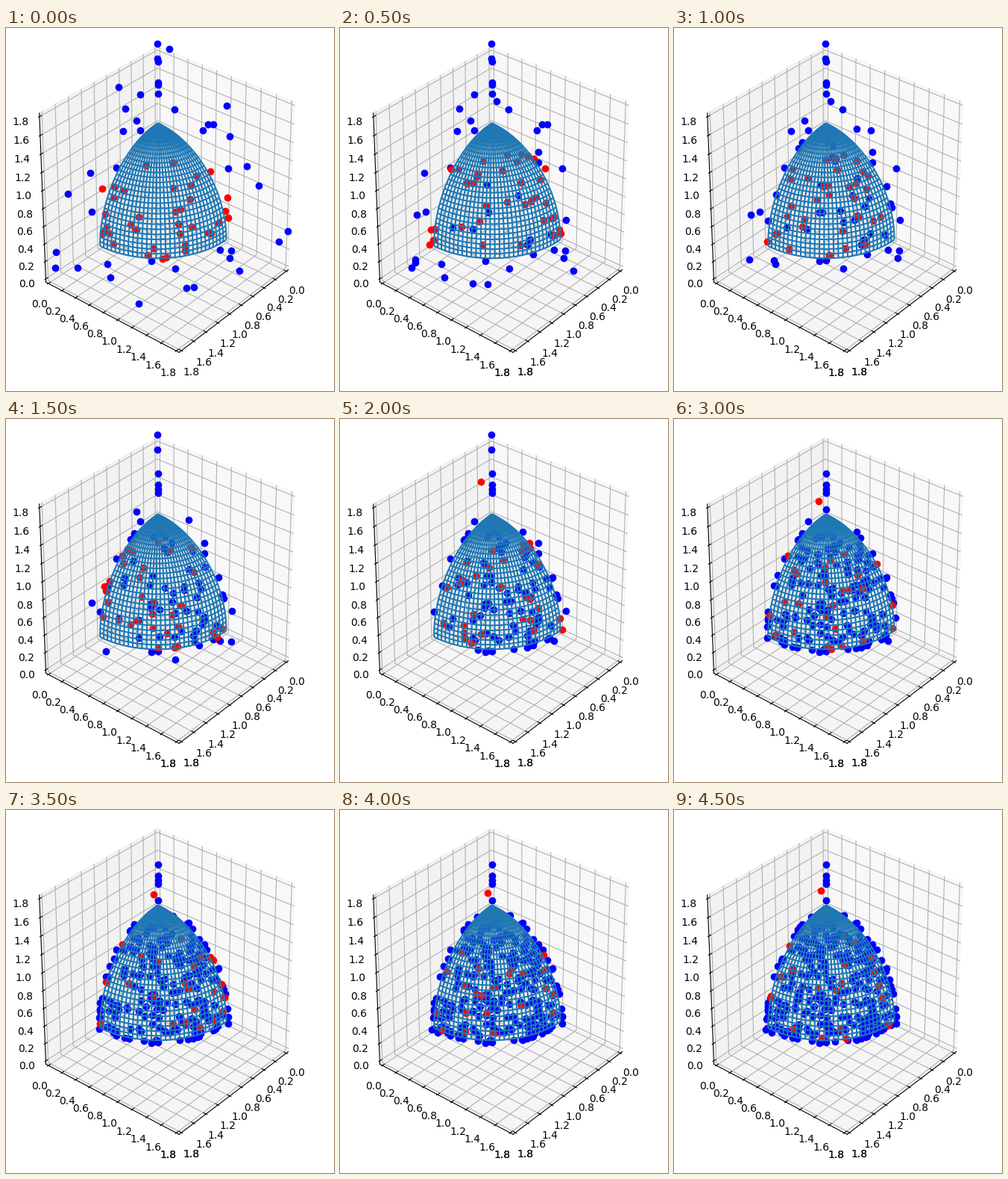
Recreate the animation shown at these times as a matplotlib script. Size 440 by 486 pixels, loop 5000 ms.

```python
import numpy as np
import matplotlib.pyplot as plt
from matplotlib.animation import FuncAnimation
from matplotlib.collections import LineCollection

W, H, DPI = 440, 486, 128
PT = 72 / DPI                      # points per pixel
FRAMES, STEP = 10, 500
TOP = 1.8                          # upper limit of every axis
LO, HI = -TOP / 48, TOP * 49 / 48  # box walls, a little outside the limits
AZIM, ELEV = np.radians(40), np.radians(30)
QUARTER = np.pi / 2


def project(x, y, z):
    """Perspective view of data coordinates, in stage pixels."""
    x, y, z = (np.asarray(v, float) / TOP - 0.5 for v in (x, y, z))
    right = y * np.cos(AZIM) - x * np.sin(AZIM)
    near = x * np.cos(AZIM) + y * np.sin(AZIM)
    up = z * np.cos(ELEV) - near * np.sin(ELEV)
    scale = 10 / (10 - near * np.cos(ELEV) - z * np.sin(ELEV))
    return 217 + 227.4 * right * scale, 222 - 249.8 * up * scale


def sphere(lat, lon, radius=1.0):
    return (radius * np.cos(lat) * np.cos(lon),
            radius * np.cos(lat) * np.sin(lon),
            radius * np.sin(lat))


fig = plt.figure(figsize=(W / DPI, H / DPI), dpi=DPI, facecolor="white")
ax = fig.add_axes([0, 0, 1, 1])
ax.set_xlim(0, W)
ax.set_ylim(H, 0)
ax.axis("off")


def path(points, color, order):
    ax.plot(*project(*np.transpose(points)), color=color, lw=1.1 * PT,
            zorder=order, solid_capstyle="projecting")


def label(tick, value, dx, dy):
    px, py = project(*tick)
    return ax.text(px + dx, py + dy, f"{value:.1f}", fontsize=13.9 * PT,
                   family="DejaVu Sans", ha="center", va="center", zorder=4)


def x_label(v):
    return label((v, HI, LO), v, 14.4 - 1.2 * v / TOP, 26.8 + 2.5 * v / TOP)


def y_label(v):
    return label((HI, v, LO), v, -12 + 1.5 * v / TOP, 28 + 2.2 * v / TOP)


def draw_box():
    walls = [
        (0.95, [(LO, LO, LO), (LO, HI, LO), (LO, HI, HI), (LO, LO, HI)]),
        (0.90, [(LO, LO, LO), (HI, LO, LO), (HI, LO, HI), (LO, LO, HI)]),
        (0.925, [(LO, LO, LO), (HI, LO, LO), (HI, HI, LO), (LO, HI, LO)]),
    ]
    for shade, corners in walls:
        ax.fill(*project(*np.transpose(corners)), color=(shade,) * 3,
                alpha=0.5, lw=1.4 * PT, zorder=0)

    t_in, t_out = HI - TOP / 60, HI + TOP / 120
    for v in np.linspace(0, TOP, 10):
        for line in ([(v, HI, LO), (v, LO, LO), (v, LO, HI)],
                     [(HI, v, LO), (LO, v, LO), (LO, v, HI)],
                     [(HI, LO, v), (LO, LO, v), (LO, HI, v)]):
            path(line, "#b0b0b0", 1)
        for tick in ([(v, t_in, LO), (v, t_out, LO)],
                     [(t_in, v, LO), (t_out, v, LO)],
                     [(t_in, LO, v), (t_out, LO, v)]):
            path(tick, "black", 3)
        x_label(v)
        y_label(v)
        label((HI, LO, v), v, -25, 7.5)
    for start, end in (((LO, HI, LO), (HI, HI, LO)),
                       ((HI, LO, LO), (HI, HI, LO)),
                       ((HI, LO, LO), (HI, LO, HI))):
        path([start, end], "black", 2)


def draw_front(n=31):
    """Wireframe of the unit sphere's positive octant."""
    lat, lon = np.meshgrid(*[np.linspace(0, QUARTER, n)] * 2)
    grid = np.stack(project(*sphere(lat, lon)), axis=-1)
    lines = list(grid) + list(grid.transpose(1, 0, 2))
    ax.add_collection(LineCollection(lines, colors="#1f77b4",
                                     linewidths=2.08 * PT, zorder=7))


rng = np.random.default_rng(7)

# Blue points on the vertical axis: height, first step, last step
COLUMN = [(1.90, 0, 5), (1.735, 0, 5), (1.70, 0, 2), (1.46, 0, 9),
          (1.435, 0, 2), (1.34, 0, 9), (1.285, 3, 9), (1.245, 3, 9),
          (1.055, 6, 9)]


def column(i):
    z = np.array([h for h, first, last in COLUMN if first <= i <= last])
    return project(0 * z, 0 * z, z)


# Early finds lie on the three coordinate planes; the farther ones die first
N_FAR = 60
far_birth = np.where(np.arange(N_FAR) < 36, 0, 1 + np.arange(N_FAR) % 2)
far_dist = rng.uniform(1.05, 1.9, N_FAR)
far_turn = rng.uniform(0, QUARTER, N_FAR)
far = np.zeros((3, N_FAR))
for k in range(N_FAR):
    far[k % 3, k] = far_dist[k] * np.cos(far_turn[k])
    far[(k + 1) % 3, k] = far_dist[k] * np.sin(far_turn[k])


def outliers(i):
    reach = 1.05 + 0.85 * np.exp(-i / 2)
    return project(*far[:, (far_birth <= i) & (far_dist <= reach)])


# Points that settle on the front, with extra ones along its rims
N_NEAR = 290
near_lat = np.arcsin(np.clip(rng.uniform(-0.07, 0.97, N_NEAR), 0, 1))
near_lon = np.clip(rng.uniform(-0.13, QUARTER + 0.13, N_NEAR), 0, QUARTER)
near_dist = rng.uniform(1.01, 1.05, N_NEAR)
near = np.array(sphere(near_lat, near_lon, near_dist))


def settled(i):
    return project(*near[:, :int(N_NEAR * (i / 9) ** 1.5)])


def population(i):
    """Red points: a fresh swarm each step, tighter as the search goes on."""
    pick = np.random.default_rng(40 + i)
    n = 38 - 2 * i
    lat = np.arcsin(pick.uniform(0, 0.88, n))
    lon = np.clip(pick.uniform(-0.1, QUARTER + 0.1, n), 0, QUARTER)
    spread = 0.01 + 0.07 * np.exp(-i / 3)
    px, py = project(*sphere(lat, lon, 1 + abs(pick.normal(0, spread, n))))
    if i >= 4:                     # one straggler hovers above the tip
        px = np.append(px, np.interp(i, [4, 5, 7, 9], [189, 189, 198, 197]))
        py = np.append(py, np.interp(i, [4, 5, 7, 9], [84, 107, 113, 108]))
    return px, py


def dots(color, order):
    return ax.plot([], [], "o", color=color, ms=8.33 * PT, mew=1.39 * PT,
                   zorder=order)[0]


draw_box()
draw_front()
blue_dots, red_dots = dots("blue", 5), dots("red", 6)
heavy = [x_label(TOP), y_label(TOP)]   # end labels darken after the start


def update(i):
    blue_dots.set_data(*np.hstack([column(i), outliers(i), settled(i)]))
    red_dots.set_data(*population(i))
    for text in heavy:
        text.set_visible(i > 0)
    return [blue_dots, red_dots, *heavy]


anim = FuncAnimation(fig, update, frames=FRAMES, interval=STEP,
                     init_func=lambda: update(0), repeat=True,
                     repeat_delay=0, blit=False)
plt.show()
```
